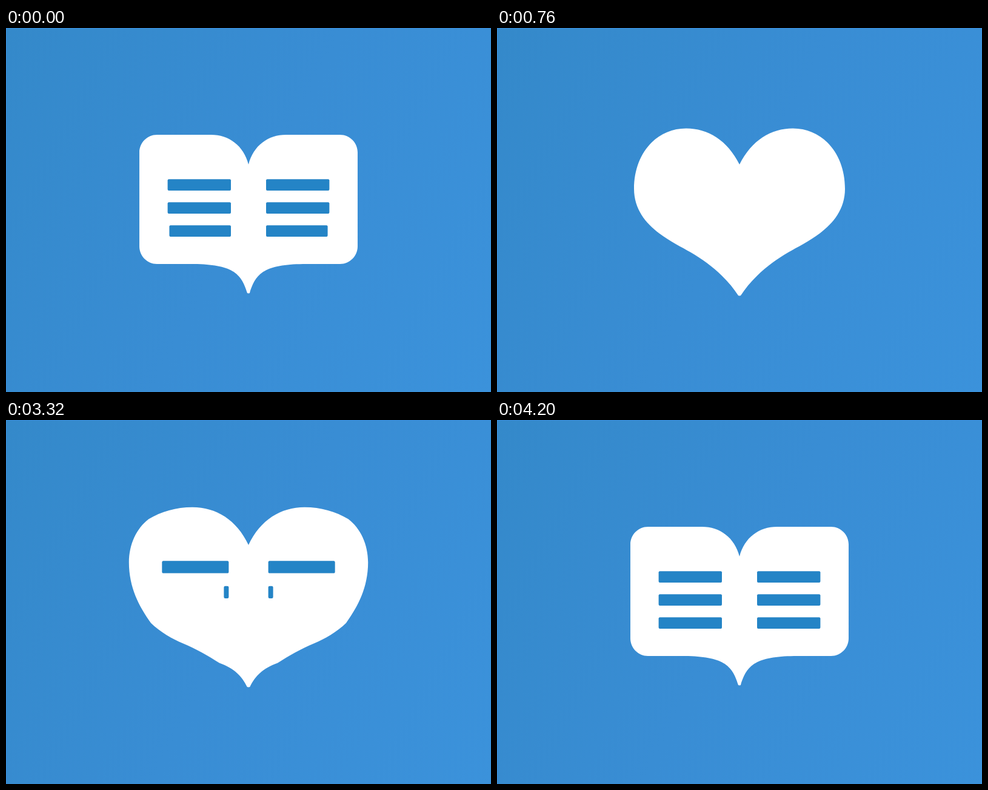
An HTML page with a canvas for the animation above (6.2 s loop, 800 by 600 pixels).

```html
<!DOCTYPE html>
<html lang="en">
<head>
<meta charset="utf-8">
<title>Book and heart</title>
<style>
  html, body { margin: 0; width: 100%; height: 100%; overflow: hidden; }
  canvas { display: block; background: linear-gradient(118deg, #3489ca, #398dd4 50%, #3b92db); }
</style>
</head>
<body>
<canvas id="stage" width="800" height="600"></canvas>
<script>
const ctx = document.getElementById('stage').getContext('2d');
const LOOP = 6200, STEP = 20, OPEN_AT = 3140;
const CENTRE = 400, BASE = 441;

const mix = (a, b, p) => a + (b - a) * p;
const mixPoint = (a, b, p) => a.map((v, i) => mix(v, b[i], p));
const span = (t, start, length) => Math.min(1, Math.max(0, (t - start) / length));
const sine = p => (1 - Math.cos(Math.PI * p)) / 2;
const backOut = p => 1 + 3 * (p - 1) ** 3 + 2 * (p - 1) ** 2;
const hump = (t, start, length) => Math.sin(Math.PI * span(t, start, length)) ** 2;

// Cubic segments, each an array of four points.
const line = (a, b) => [a, mixPoint(a, b, 1 / 3), mixPoint(a, b, 2 / 3), b];
const corner = (a, c, b) => [a, mixPoint(a, c, .55), mixPoint(b, c, .55), b];

function split(curve, p) {
  const head = [], tail = [];
  for (let points = curve; points.length;) {
    head.push(points[0]);
    tail.unshift(points[points.length - 1]);
    points = points.slice(1).map((q, i) => mixPoint(points[i], q, p));
  }
  return [head, tail];
}

// Left halves, from the notch counter-clockwise to the tip.
function bookHalf() {
  const left = 220, top = 176, bottom = 389, r = 29;
  const start = [338, top], end = [310, bottom];
  const topLeft = [left + r, top], leftTop = [left, top + r];
  const leftBottom = [left, bottom - r], bottomLeft = [left + r, bottom];
  return [
    [[CENTRE, 225], [392, 194], [368, top], start],
    line(start, topLeft),
    corner(topLeft, [left, top], leftTop),
    line(leftTop, leftBottom),
    corner(leftBottom, [left, bottom], bottomLeft),
    line(bottomLeft, end),
    [end, [372, 390], [388, 403], [398, 437]]
  ];
}

function heartHalf() {
  const top = [312, 165.5], side = [226, 265], waist = [319, 369.5];
  return [
    [[CENTRE, 225], [380, 185], [348, top[1]], top],
    ...split([top, [262, top[1]], [side[0], 208], side], .45),
    ...split([side, [side[0], 325], [287, 351], waist], .56),
    ...split([waist, [352, 388.5], [381, 414], [398, BASE]], .58)
  ];
}

const BOOK = bookHalf(), HEART = heartHalf();

// Paints the left half and its mirror image.
function mirrored(paint) {
  for (const side of [1, -1]) {
    ctx.save();
    ctx.translate(CENTRE, 0);
    ctx.scale(side, 1);
    ctx.translate(-CENTRE, 0);
    paint();
    ctx.restore();
  }
}

function drawHalf(heart) {
  const half = BOOK.map((curve, i) =>
    curve.map((point, j) => mixPoint(point, HEART[i][j], heart)));
  const tip = half[half.length - 1][3];
  ctx.beginPath();
  ctx.moveTo(...half[0][0]);
  for (const [, a, b, end] of half) ctx.bezierCurveTo(...a, ...b, ...end);
  ctx.lineTo(CENTRE, tip[1] + .5);
  ctx.closePath();
  ctx.fillStyle = '#fff';
  ctx.fill();
}

function drawRows(sizeOf) {
  ctx.fillStyle = '#2484c6';
  for (let row = 0; row < 3; row++) {
    const width = 104.4 * sizeOf(row);
    if (width < .1) continue;
    ctx.beginPath();
    ctx.roundRect(371 - width, 249.3 + 38 * row, width, 18.6, Math.min(2, width / 2));
    ctx.fill();
  }
}

function drawSpark(x0, y0, x1, y1, t) {
  const head = sine(span(t, 250, 110)), tail = sine(span(t, 400, 120));
  if (head <= 0 || tail >= 1) return;
  ctx.strokeStyle = '#fff';
  ctx.lineWidth = 10;
  ctx.lineCap = 'round';
  ctx.beginPath();
  ctx.moveTo(mix(x0, x1, tail), mix(y0, y1, tail));
  ctx.lineTo(mix(x0, x1, head), mix(y0, y1, head));
  ctx.stroke();
}

// Book leaps up and lands as a heart.
const closing = t => ({
  heart: sine(span(t, 60, 475)),
  scaleX: 1 + .12 * hump(t, 324, 320),
  scaleY: 1 + .53 * hump(t, 40, 485),
  rowSize: row => 1 - sine(span(t, 167 * (2 - row), 200))
});

// Heart stretches and flings open into a book.
const opening = t => ({
  heart: 1 - sine(span(t, 60, 450)),
  scaleX: 1 + .355 * hump(t, 100, 500),
  scaleY: 1 + .14 * hump(t, 10, 270),
  rowSize: row => backOut(span(t, 96 + 100 * row, 360))
});

function draw(now) {
  const time = now % LOOP, isOpening = time >= OPEN_AT;
  const t = time + STEP - (isOpening ? OPEN_AT : 0);
  const pose = isOpening ? opening(t) : closing(t);

  ctx.clearRect(0, 0, 800, 600);
  ctx.fillStyle = '#3b90df';
  ctx.fillRect(0, 0, 800, 1);
  ctx.fillRect(0, 0, 1, 600);

  ctx.save();
  ctx.translate(CENTRE, BASE);
  ctx.scale(pose.scaleX, pose.scaleY);
  ctx.translate(-CENTRE, -BASE);
  mirrored(() => {
    drawHalf(pose.heart);
    drawRows(pose.rowSize);
  });
  ctx.restore();

  if (isOpening) mirrored(() => {
    drawSpark(122, 357, 93, 357, t);
    drawSpark(124, 393, 95, 412, t);
    drawSpark(155, 407, 155, 434, t);
  });
}

function tick() {
  draw(performance.now());
  requestAnimationFrame(tick);
}
tick();
</script>
</body>
</html>
```
